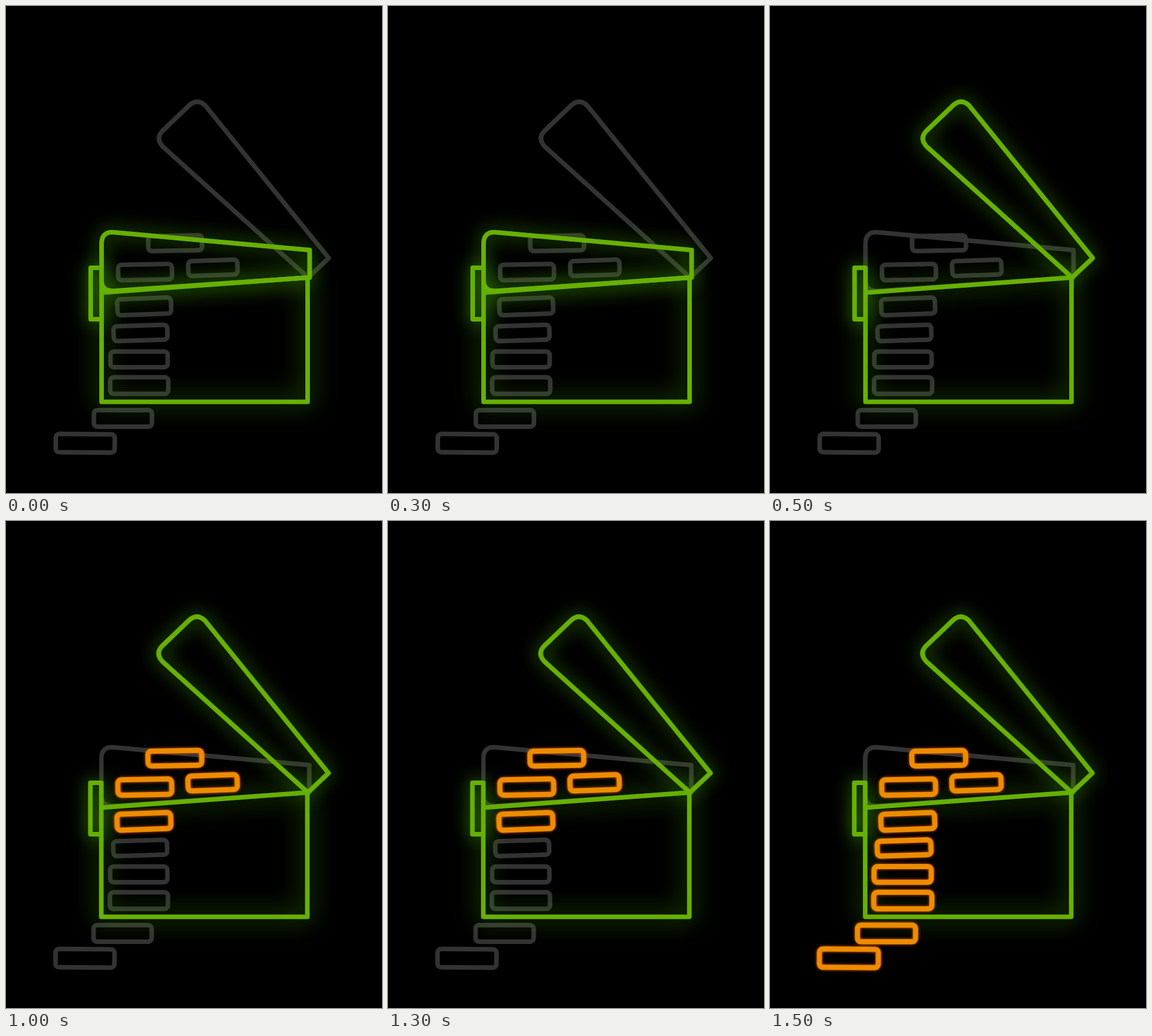
An HTML page for the animation above (2 s loop, 657 px wide and 852 px high).

```html
<!DOCTYPE html>
<html lang="en">
<head>
<meta charset="utf-8">
<title>Neon chest</title>
<style>
  html, body { margin: 0; width: 100%; height: 100%; overflow: hidden; background: #000; }
  svg { display: block; width: 100vw; height: 100vh; }
  use, path { fill: none; stroke-linejoin: round; stroke-linecap: round; }
  .off { stroke: #333; stroke-width: 8; }
  .green { stroke: #67b004; stroke-width: 8; }
  .orange { stroke: #ed8c00; stroke-width: 9; }
  .sign, .lit { animation: 2s step-end infinite; }
  .sign { animation-name: drift; }
  .closed { animation-name: closed; }
  .open { animation-name: open; }
  .upper { animation-name: upper; }
  .lower { animation-name: lower; }
  @keyframes drift {
    0% { transform: none; }
    25% { transform: translateX(-.2px); }
    50% { transform: translateX(-.5px); }
    75%, 100% { transform: translateX(-.7px); }
  }
  @keyframes closed { 0% { opacity: 1; } 25%, 100% { opacity: 0; } }
  @keyframes open { 0% { opacity: 0; } 25%, 100% { opacity: 1; } }
  @keyframes upper { 0% { opacity: 0; } 50%, 100% { opacity: 1; } }
  @keyframes lower { 0% { opacity: 0; } 75%, 100% { opacity: 1; } }
</style>
</head>
<body>
<svg viewBox="0 0 657 852">
  <defs>
    <filter id="wide" filterUnits="userSpaceOnUse" x="0" y="0" width="657" height="852" color-interpolation-filters="sRGB">
      <feDropShadow dx="0" dy="0" stdDeviation="21" flood-color="#48b000" flood-opacity=".8"/>
    </filter>
    <filter id="soft" filterUnits="userSpaceOnUse" x="0" y="0" width="657" height="852" color-interpolation-filters="sRGB">
      <feDropShadow dx="0" dy="0" stdDeviation="16" flood-color="#48b000" flood-opacity=".85"/>
    </filter>
    <filter id="hot" filterUnits="userSpaceOnUse" x="0" y="0" width="657" height="852" color-interpolation-filters="sRGB">
      <feDropShadow dx="0" dy="0" stdDeviation="2.6" flood-color="#e85000"/>
    </filter>
    <path id="box" d="M167 501.500L527 475V692.500H167Z"/>
    <path id="latch" d="M167 458H148V548H167Z"/>
    <path id="closedLid" d="M167 416Q167 394 189 396L530.500 427V475L188 498.500Q167 499 167 480Z"/>
    <path id="openLid" d="M320 174Q334 161 348 174L564 441L528 475L274 246Q261 232 273 219Z"/>
    <g id="upperBricks">
      <rect x="248.500" y="402" width="94" height="26" rx="6" transform="rotate(-1 295.500 415)"/>
      <rect x="196" y="452" width="94" height="27" rx="6" transform="rotate(-1 243 465.500)"/>
      <rect x="318.500" y="445" width="86" height="26" rx="6" transform="rotate(-2 361.500 458)"/>
      <rect x="194.500" y="511.500" width="94" height="28" rx="6" transform="rotate(-2 241.500 525.500)"/>
    </g>
    <g id="lowerBricks">
      <rect x="188" y="559" width="94" height="26" rx="6" transform="rotate(-1.800 235 572)"/>
      <rect x="182.500" y="604.500" width="100" height="27.500" rx="6"/>
      <rect x="182" y="649.500" width="101.500" height="29" rx="6"/>
      <rect x="153.500" y="707" width="101.500" height="29" rx="6"/>
      <rect x="87" y="749" width="103" height="32" rx="6" transform="rotate(.400 138.500 765)"/>
    </g>
  </defs>
  <rect width="657" height="852"/>
  <g class="sign">
    <g class="off">
      <use href="#closedLid"/>
      <use href="#openLid"/>
      <use href="#upperBricks"/>
      <use href="#lowerBricks"/>
    </g>
    <g class="green">
      <use href="#box" filter="url(#wide)"/>
      <use href="#latch" filter="url(#soft)"/>
      <g class="lit closed"><use href="#closedLid" filter="url(#soft)"/></g>
      <g class="lit open"><use href="#openLid" filter="url(#soft)"/></g>
    </g>
    <g class="orange">
      <g class="lit upper"><use href="#upperBricks" filter="url(#hot)"/></g>
      <g class="lit lower"><use href="#lowerBricks" filter="url(#hot)"/></g>
    </g>
  </g>
</svg>
</body>
</html>
```
